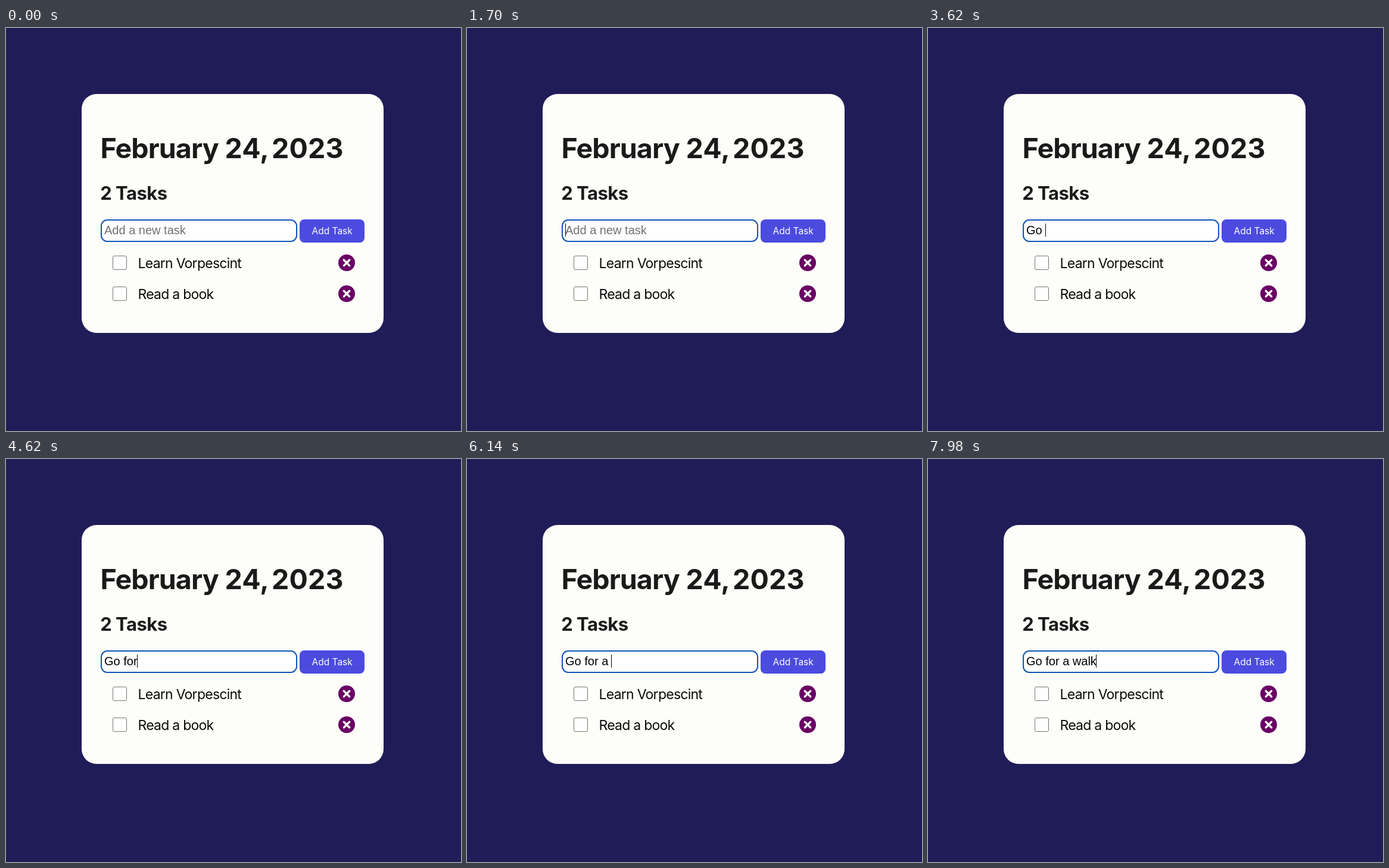
Write an HTML page that moves like this. It is 764 by 678 pixels and loops after 8000 ms.

```html
<!DOCTYPE html>
<html lang="en">
<head>
<meta charset="utf-8">
<title>Task list</title>
<style>
  html, body { margin: 0; width: 100%; height: 100%; overflow: hidden; background: #201c57; }
  svg { display: block; }
  text { font-family: Inter, sans-serif; font-optical-sizing: none; fill: #0a0a0a; white-space: pre; }
  .title { font-size: 46.5px; font-weight: 700; letter-spacing: -.9px; fill: #1a1a1a; }
  .digits { letter-spacing: .2px; }
  .count { font-size: 31px; font-weight: 700; letter-spacing: -.5px; fill: #1a1a1a; }
  .item { font-size: 23px; letter-spacing: -.75px; }
  .button { font-size: 15.5px; fill: #fff; }
  .field { font-family: "Liberation Sans", Arial, sans-serif; font-size: 20px; fill: #000; }
  .hint { fill: #707070; }
</style>
</head>
<body>
<svg width="764" height="678" viewBox="0 0 764 678">
  <defs>
    <g id="controls">
      <rect x="179.5" y="-11.5" width="23" height="23" rx="2.5" fill="#fff" stroke="#767676"/>
      <circle cx="572" r="14" fill="#690064"/>
      <path d="M567.3-4.7l9.4 9.4m0-9.4l-9.4 9.4" stroke="#fdfdfb" stroke-width="3.4" stroke-linecap="round"/>
    </g>
  </defs>
  <rect x="127" y="111" width="507" height="402" rx="25" fill="#fdfdf9"/>
  <text class="title" x="158.5" y="219">February <tspan class="digits" x="367.5">24, </tspan><tspan class="digits" x="446">2023</tspan></text>
  <text class="count" x="158.2" y="289">2 Tasks</text>

  <rect x="160" y="323" width="328" height="36" rx="10" fill="#fff" stroke="#0d54b8" stroke-width="2"/>
  <text class="field hint" id="hint" x="165" y="347">Add a new task</text>
  <text class="field" id="typed" x="165" y="347"></text>
  <rect id="caret" y="329" width="1" height="22"/>

  <rect x="493" y="322" width="109" height="39" rx="8" fill="#4b4be0"/>
  <text class="button" x="513.5" y="347">Add Task</text>

  <use href="#controls" y="395"/>
  <text class="item" x="221.5" y="404">Learn Vorpescint</text>
  <use href="#controls" y="447"/>
  <text class="item" x="221.5" y="456">Read a book</text>
</svg>
<script>
  const LOOP = 8000, BLINK = 500, FIRST_BLINK = 300;
  const phrase = "Go for a walk";
  // Time of each keystroke in ms.
  const keys = [2500, 2720, 3300, 4020, 4280, 4520, 4800, 5100, 5900, 6660, 7220, 7460, 7700];
  const [hint, typed, caret] = ["hint", "typed", "caret"].map(id => document.getElementById(id));

  function draw(now) {
    const t = now % LOOP;
    const count = keys.filter(key => key <= t).length;
    const blinkStart = count ? keys[count - 1] : FIRST_BLINK;
    const caretOn = t >= blinkStart && Math.floor((t - blinkStart) / BLINK) % 2 === 0;

    typed.textContent = phrase.slice(0, count);
    hint.style.display = count ? "none" : "";
    const width = count ? typed.getComputedTextLength() : 0;
    caret.setAttribute("x", Math.floor(165 + width));
    caret.style.display = caretOn ? "" : "none";
    requestAnimationFrame(draw);
  }
  draw(0);
</script>
</body>
</html>
```
